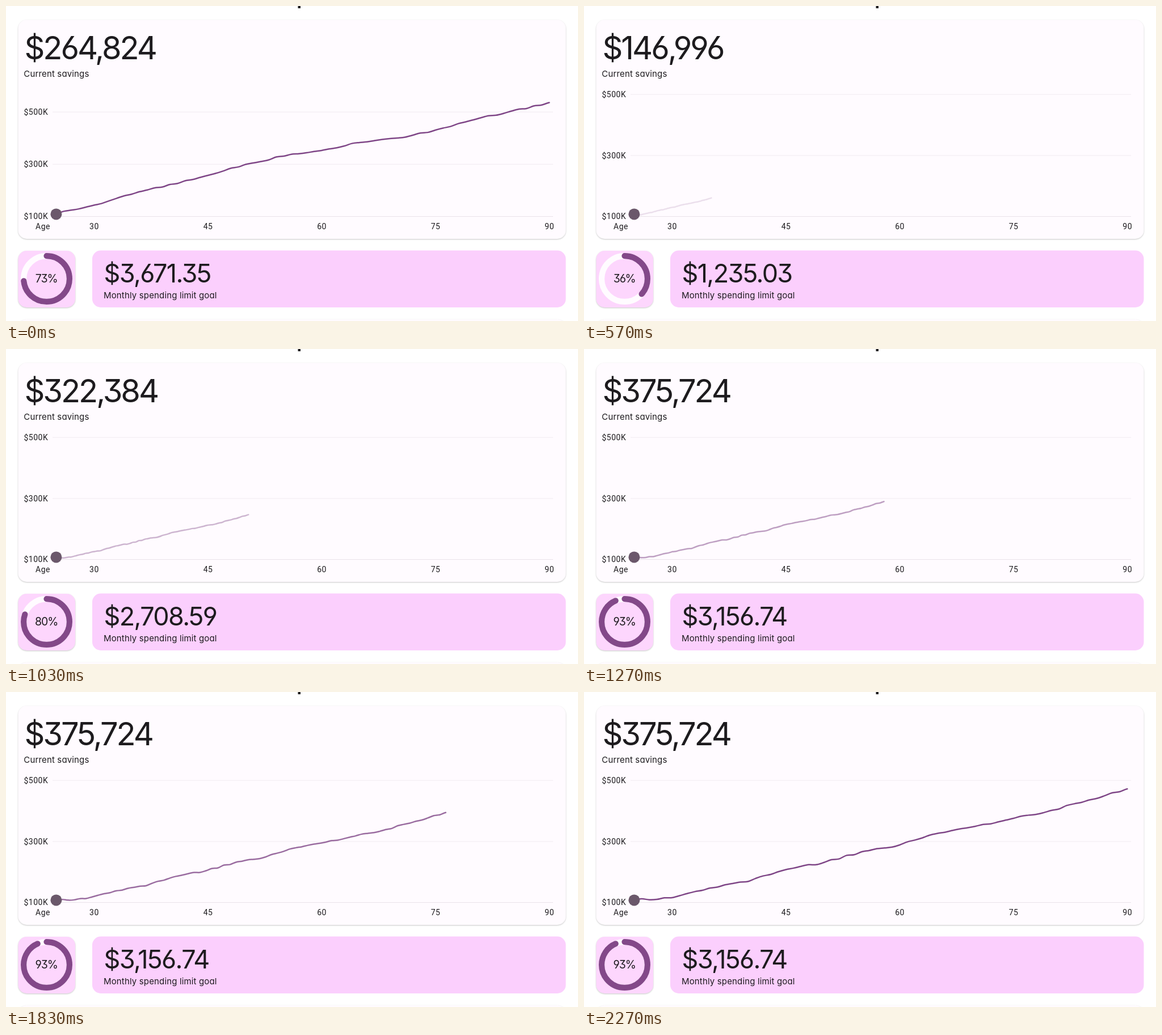
Animation of 1008x556 px, one loop 2.51 s. Source, as an HTML page:

```html
<!DOCTYPE html>
<html lang="en">
<head>
<meta charset="utf-8">
<title>Savings dashboard</title>
<style>
  html, body { margin: 0; width: 100%; height: 100%; overflow: hidden; background: #fff; }
  svg { display: block; width: 100%; height: 100%; }
  text { fill: #1d1b1e; }
  .geo {
    font-family: Inter, Lato, sans-serif;
    font-optical-sizing: none;
    font-feature-settings: "cv03", "cv04", "cv09", "cv11";
  }
  .amount { letter-spacing: -.055em; }
  #limit { letter-spacing: -.037em; }
  .label { font-size: 15px; letter-spacing: .15px; }
  .axis text { font: 14px Roboto, sans-serif; letter-spacing: .5px; }
  .mid { text-anchor: middle; }
  .card { fill: #fffbff; filter: drop-shadow(0 1px 1px rgba(0, 0, 0, .22)); }
  .ring { fill: none; stroke-width: 10.2; }
</style>
</head>
<body>
<svg viewBox="0 0 1008 556">
  <rect width="1008" height="556" fill="#fff"/>
  <rect x="514.5" width="4.5" height="4" fill="#1d1b1e"/>

  <rect class="card" x="21.5" y="24.5" width="965" height="386.5" rx="15"/>
  <text class="geo amount" id="savings" x="32.5" y="94.3" font-size="56"></text>
  <text class="geo label" x="31.3" y="125">Current savings</text>
  <g class="axis" id="axis"></g>
  <path id="line" fill="none" stroke="#7f4687" stroke-width="2.5" stroke-linecap="round" stroke-linejoin="round"/>
  <circle cx="88.4" cy="367.4" r="10" fill="#6b586b"/>

  <rect class="card" x="21.5" y="432" width="100.5" height="100" rx="15" style="fill:#fdd6fd"/>
  <circle class="ring" cx="71.5" cy="481.5" r="40.4" stroke="#fffbff"/>
  <circle class="ring" id="arc" cx="71.5" cy="481.5" r="40.4" stroke="#834889" stroke-linecap="round"
          pathLength="100" transform="rotate(-90 71.5 481.5)"/>
  <text class="geo amount mid" id="percent" x="71.2" y="488" font-size="19.5"></text>

  <rect x="152" y="431.5" width="834.5" height="100.5" rx="15" fill="#fbcffd"/>
  <text class="geo amount" id="limit" x="172.5" y="488" font-size="45"></text>
  <text class="geo label" x="172" y="516">Monthly spending limit goal</text>

  <rect class="card" x="21.5" y="553" width="965" height="60" rx="15"/>
</svg>
<script>
const LOOP = 2510, STEP = 1000 / 30, FIRST = 8;
const X0 = 88.3, YEAR = 13.37, YEARS = 65, BASE = 370;
const $ = id => document.getElementById(id);
const clamp = v => Math.max(0, Math.min(1, v));

// Straight-line reading between [x, y] keys
function sample(keys, x) {
  let i = 1;
  while (i < keys.length - 1 && x > keys[i][0]) i++;
  const [[xa, ya], [xb, yb]] = [keys[i - 1], keys[i]];
  return ya + (yb - ya) * clamp((x - xa) / (xb - xa));
}

function random(seed) {
  return () => (seed = seed * 16807 % 2147483647) / 2147483647;
}

// Yearly heights: a trend with a key every five years, plus small ripples
function walk(trend, seed) {
  const keys = trend.map((y, i) => [i * 5, y]);
  const rnd = random(seed);
  return Array.from({ length: YEARS + 1 }, (_, i) =>
    sample(keys, i) + (i % 5 ? (rnd() - .5) * 3 : 0));
}

const before = walk([367, 351.5, 332, 315, 299, 279.5, 265, 255, 241, 233, 219, 201, 185.5, 170.5], 71);
const after = walk([367.5, 363, 346, 334.5, 313.5, 301, 282, 270, 249.6, 237, 223, 209, 190.5, 171], 29);

// Smooth path through the values, scaled about its starting corner
function curve(values, scale) {
  const at = i => BASE + (values[Math.max(0, Math.min(YEARS, i))] - BASE) * scale;
  const point = (i, y) => `${(X0 + i * YEAR * scale).toFixed(2)} ${y.toFixed(2)} `;
  let d = 'M' + point(0, at(0));
  for (let i = 0; i < YEARS; i++) {
    d += 'C' + point(i + 1 / 3, at(i) + (at(i + 1) - at(i - 1)) / 6)
             + point(i + 2 / 3, at(i + 1) - (at(i + 2) - at(i)) / 6)
             + point(i + 1, at(i + 1));
  }
  return d;
}

function axis(gap) {
  let out = '';
  ['$100K', '$300K', '$500K'].forEach((name, i) => {
    const y = 371.5 - i * gap;
    out += `<path d="M82 ${y}H964" stroke="${i ? '#f4eef4' : '#e9e2e9'}" stroke-width="1.2"/>
      <text x="31.5" y="${y + 4.8}">${name}</text>`;
  });
  out += '<text x="52" y="394">Age</text>';
  for (let age = 30; age <= 90; age += 15)
    out += `<text class="mid" x="${X0 + (age - 25) * YEAR + .3}" y="394">${age}</text>`;
  return out;
}

// Share of the final amounts by step, near enough one second in all
const COUNT = [[5.27, 0], [11, .191135], [23, .591334], [31, .8580341], [35.26, 1]];

const money = (v, digits) => '$' + v.toLocaleString('en-US',
  { minimumFractionDigits: digits, maximumFractionDigits: digits });

function show(savings, limit, percent) {
  $('savings').textContent = money(savings, 0);
  $('limit').textContent = money(limit, 2);
  $('percent').textContent = Math.floor(percent) + '%';
  $('arc').setAttribute('stroke-dasharray', `${percent} 200`);
}

function drawChart(values, p, gap) {
  $('axis').innerHTML = axis(gap);
  $('line').setAttribute('d', curve(values, p));
  $('line').setAttribute('stroke-opacity', p);
}

let last = -1;
function render(t) {
  const k = Math.floor((t + 3.5) / STEP);
  if (k === last) return;
  last = k;
  if (k < FIRST) {
    show(264824, 3671.35, 73.5);
    drawChart(before, 1, 92.2);
  } else {
    const p = sample(COUNT, k);
    show(375724 * p, 3156.74 * p, 93.6 * p);
    drawChart(after, clamp((k - 7.6) / 60), 107.7);
  }
}

const start = performance.now();
function tick() {
  render((performance.now() - start) % LOOP);
  requestAnimationFrame(tick);
}
tick();
</script>
</body>
</html>
```
